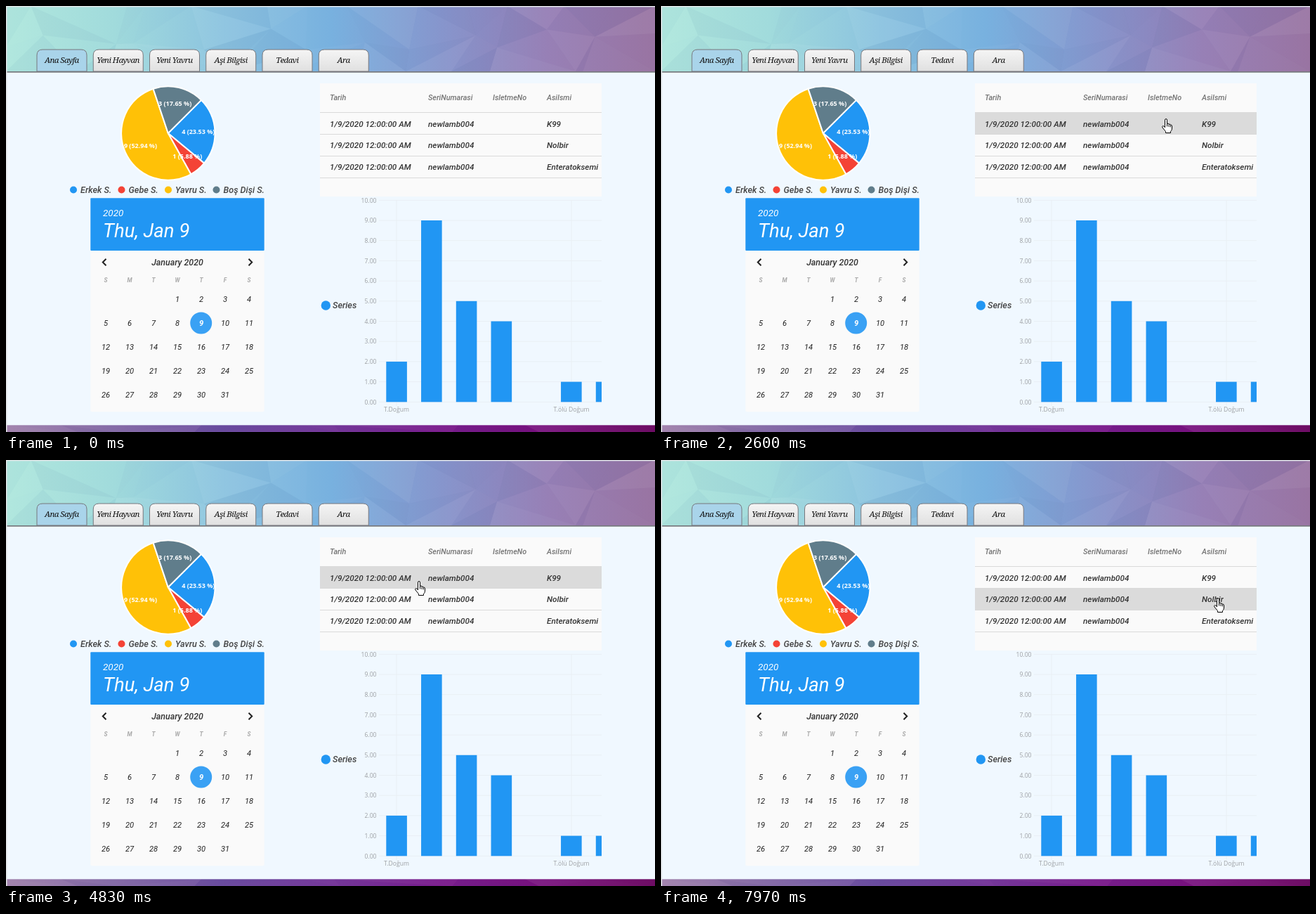
Write an HTML page that moves like this. It is 924x606 px and loops after 8 s.

```html
<!DOCTYPE html>
<html lang="tr">
<head>
<meta charset="utf-8">
<style>
  html, body { margin: 0; width: 100%; height: 100%; overflow: hidden; background: #f0f8ff; }
  svg { display: block; width: 924px; height: 606px; }
  text { font: italic 500 11.7px Roboto, sans-serif; fill: #333; white-space: pre; }
  .mid { text-anchor: middle; }
  .end { text-anchor: end; }
  .tab { font: italic 400 11.5px "Noto Serif", serif; letter-spacing: -.55px; fill: #111; }
  .pie { font: 700 9px "Open Sans", sans-serif; fill: #fff; }
  .key { font-size: 12.6px; fill: #444; }
  .head { font-size: 10.75px; fill: #737373; }
  .head.on { fill: #333; }
  .axis { font: 400 8.6px "Open Sans", sans-serif; fill: #9c9fa2; }
  .year { font-size: 13.5px; font-weight: 400; fill: #fff; }
  .date { font-size: 27.6px; font-weight: 400; fill: #fff; }
  .month { font-size: 12.4px; }
  .week { font-size: 8.4px; font-weight: 700; fill: #aaa; }
  .day { font-size: 11.2px; font-weight: 400; fill: #222; }
  .today { font-size: 11.2px; font-weight: 700; fill: #fff; }
  .tip { font-size: 12.3px; }
</style>
</head>
<body>
<svg viewBox="0 0 924 606">
  <defs>
    <linearGradient id="sky"></linearGradient>
    <linearGradient id="foot"></linearGradient>
    <linearGradient id="tab" x2="0" y2="1">
      <stop stop-color="#f5f5f5"/><stop offset="1" stop-color="#e0e0e0"/>
    </linearGradient>
  </defs>
  <g id="page"></g>
  <g id="table"></g>
  <g id="tip">
    <rect x="-.5" y=".5" width="103" height="42" rx="3" fill="#000" opacity=".05"/>
    <rect width="102" height="41" rx="2" fill="#fafafa" opacity=".8"/>
    <text class="tip" x="13.5" y="15">T.Dişi Kuzu S.</text>
    <circle cx="17.3" cy="28" r="6.7" fill="#2196f3"/>
    <text class="tip" x="28" y="32">Series</text>
    <text class="tip" x="67.5" y="32">5.00</text>
  </g>
  <g id="hand" stroke="#000" stroke-linejoin="round" stroke-linecap="round">
    <path fill="#fff" d="M4.5 12V2.2Q4.5.6 6 .6T7.5 2.2V7.5Q9.7 6.3 10 8.3Q12 7.3 12.3 9.2Q14.4 8.6 14.5 11V14Q14.5 17 12.5 18.5V20.5H5.5V18.5L1 13Q0 11 1.6 10.6Q3 10.6 4.5 12.6Z"/>
    <path fill="none" d="M7.5 8v3M10 9v2.5M12.3 10v2"/>
  </g>
</svg>
<script>
const $ = id => document.getElementById(id);
const BLUE = '#2196f3', RED = '#f44336', AMBER = '#ffc107', SLATE = '#607d8b';

const rect = (x, y, w, h, fill, more = '') =>
  `<rect x="${x}" y="${y}" width="${w}" height="${h}" fill="${fill}" ${more}/>`;
const dot = (x, y, r, fill) => `<circle cx="${x}" cy="${y}" r="${r}" fill="${fill}"/>`;
const line = (d, color, w = 1) => `<path d="${d}" fill="none" stroke="${color}" stroke-width="${w}"/>`;
const text = (x, y, s, cls = '') => `<text x="${x}" y="${y}" class="${cls}">${s}</text>`;
const stops = colors => colors.split(' ').map((c, i, all) =>
  `<stop offset="${i / (all.length - 1)}" stop-color="#${c}"/>`).join('');

let seed = 7;
const rand = () => (seed = seed * 16807 % 2147483647) / 2147483647;

// low-poly shading: a jittered grid cut into faint light and dark triangles
function facets(top, height, nx, ny, strength) {
  const w = 924 / nx, h = height / ny, pts = [];
  for (let j = 0; j <= ny; j++)
    for (let i = 0; i <= nx; i++) {
      const x = i % nx ? (i + rand() - .5) * w : i * w;
      const y = j % ny ? (j + (rand() - .5) * .8) * h : j * h;
      pts.push(`${x.toFixed(1)},${(top + y).toFixed(1)}`);
    }
  let out = '';
  for (let j = 0; j < ny; j++)
    for (let i = 0; i < nx; i++) {
      const a = j * (nx + 1) + i, b = a + 1, c = a + nx + 1, d = c + 1;
      for (const tri of rand() < .5 ? [[a, b, c], [b, c, d]] : [[a, b, d], [a, c, d]]) {
        const shade = (rand() - .5) * strength;
        out += `<polygon points="${tri.map(k => pts[k]).join(' ')}" fill="${shade > 0 ? '#fff' : '#204080'}" opacity="${Math.abs(shade)}"/>`;
      }
    }
  return out;
}

function banner() {
  $('sky').innerHTML = stops('b0e7dd a1dbdc 8cc3df 78b1df 8595cc 957eb5 9873a1');
  $('foot').innerHTML = stops('9c7ca8 8167a4 6c4c9f 76389a 7a1c8c 760f7b 65005c');
  const tabs = ['Ana Sayfa', 'Yeni Hayvan', 'Yeni Yavru', 'Aşi Bilgisi', 'Tedavi', 'Ara'].map((s, i) => {
    const x = 44 + 80.25 * i;
    return `<path d="M${x} 93V70q0 -8 8 -8h55q8 0 8 8v23z" fill="${i ? 'url(#tab)' : '#a9d4ea'}" stroke="#77777c"/>` +
      text(x + 35.3, 81, s, 'tab mid');
  }).join('');
  return rect(0, 0, 924, 606, '#f0f8ff') +
    rect(0, 0, 924, 93, 'url(#sky)') + facets(0, 93, 13, 2, .12) +
    rect(0, 596.3, 924, 10, 'url(#foot)') + facets(596.3, 10, 9, 1, .14) +
    rect(0, 0, 924, 1.4, '#e4e8ea') + rect(0, 0, 1.5, 606, '#e2e5e8') +
    rect(1.5, 93, 922.5, 1.7, '#76787c') + tabs;
}

function pie() {
  const cx = 230.8, cy = 181, r = 66.7;
  const at = (a, d = r) => [cx + d * Math.cos(a), cy + d * Math.sin(a)];
  let a = -Math.PI / 4, slices = '', labels = '', keys = '';
  const parts = [[4, BLUE, 'Erkek S.', 96], [1, RED, 'Gebe S.', 164.5], [9, AMBER, 'Yavru S.', 231], [3, SLATE, 'Boş Dişi S.', 299.5]];
  for (const [n, color, name, x] of parts) {
    const b = a + n / 17 * 2 * Math.PI, [lx, ly] = at((a + b) / 2, 43);
    slices += `<path d="M${cx} ${cy}L${at(a)}A${r} ${r} 0 ${+(n > 8)} 1 ${at(b)}Z" fill="${color}" stroke="#fff" stroke-width="2"/>`;
    labels += text(lx, ly + 3.3, `${n} (${(n / .17).toFixed(2)} %)`, 'pie mid');
    keys += dot(x, 261.5, 5, color) + text(x + 10, 266, name, 'key');
    a = b;
  }
  return slices + labels + keys;
}

function calendar() {
  let out = rect(120.3, 273.3, 247.4, 304, '#fafafa', 'rx="2"') + rect(120.3, 273.3, 247.4, 74.7, BLUE, 'rx="1"') +
    text(138, 299, '2020', 'year') + text(138, 328.5, 'Thu, Jan 9', 'date') +
    text(244, 368.7, 'January 2020', 'month mid') +
    line('M142.5 359.8l-4.7 4.7l4.7 4.7M345.5 359.8l4.7 4.7l-4.7 4.7', '#222', 2);
  [...'SMTWTFS'].forEach((s, i) => out += text(142 + 34 * i, 392.5, s, 'week mid'));
  for (let d = 1; d <= 31; d++) {
    const x = 142 + 34 * ((d + 2) % 7), y = 417 + 34 * Math.floor((d + 2) / 7);
    if (d === 9) out += dot(x - .3, y, 15.5, '#3aa1f4');
    out += text(x, y + 4, d, d === 9 ? 'today mid' : 'day mid');
  }
  return out;
}

function chart() {
  const unit = 28.7, base = 563.3;
  let out = rect(447, 110, 401, 161, '#fafafa');
  for (let i = 0; i <= 10; i++) {
    const y = base - unit * i;
    out += line(`M531 ${y}H848`, '#e9eff4') + text(527.5, y + 3.2, i.toFixed(2), 'axis end');
  }
  out += line('M556 276V569M805 276V569', '#e9eff4');
  [2, 9, 5, 4, 0, 1, 1].forEach((n, i) => {
    const x = 541.3 + 49.75 * i;
    out += rect(x, base - unit * n, Math.min(29.6, 848 - x), unit * n, BLUE);
  });
  return out + text(556, 577, 'T.Doğum', 'axis mid') + text(805, 577, 'T.ölü Doğum', 'axis mid') +
    dot(455.3, 426, 6.7, BLUE) + text(465, 430.3, 'Series', 'key');
}

const cols = [['Tarih', 461], ['SeriNumarasi', 601], ['IsletmeNo', 693], ['AsiIsmi', 770]];
const vaccines = ['K99', 'Nolbir', 'Enteratoksemi'];

function table(row, col) {
  let out = row >= 0 ? rect(447, 151.5 + 31 * row, 401, 31, '#dbdbdb') : '';
  for (let i = 0; i < 4; i++) out += line(`M447 ${151.5 + 31 * i}H848`, '#dadada');
  cols.forEach(([s, x], i) => out += text(x, 134, s, i === col ? 'head on' : 'head'));
  vaccines.forEach((name, i) => {
    ['1/9/2020 12:00:00 AM', 'newlamb004', '', name].forEach((s, j) =>
      out += text(cols[j][1], 171.5 + 30.8 * i, s));
  });
  return out;
}

// pointer turning points: time, left, top
const path = [
  [530, 805, 606], [1070, 518, 426], [1450, 442, 340], [2160, 690, 126], [2600, 713, 160],
  [2980, 735, 166], [3270, 766, 212], [3640, 774, 214], [4110, 774, 214], [4740, 605, 172],
  [5100, 514, 172], [5940, 625, 158], [6370, 601, 127], [7000, 790, 136], [7300, 774, 132],
  [7970, 787, 196], [8000, 787, 196]
];

function pointer(t) {
  const i = path.findIndex(p => p[0] > t);
  if (i < 1) return null;
  const [a, b] = [path[i - 1], path[i]], k = (t - a[0]) / (b[0] - a[0]);
  return [1, 2].map(j => Math.round(a[j] + (b[j] - a[j]) * k));
}

const show = (el, on) => el.setAttribute('visibility', on ? 'visible' : 'hidden');
const move = (el, x, y) => el.setAttribute('transform', `translate(${x} ${y})`);
let state;

function draw(now) {
  const t = now % 8000, p = pointer(t);
  let row = -1, col = -1;
  show($('hand'), p);
  if (p) {
    const [x, y] = p;
    move($('hand'), x, y);
    if (x + 6 >= 447 && y < 245) {
      if (y >= 152) row = Math.floor((y - 152) / 31);
      else col = cols.filter(c => c[1] - 14 <= x + 6).length - 1;
    }
  }
  if (state !== row + '/' + col) {
    state = row + '/' + col;
    $('table').innerHTML = table(row, col);
  }
  const k = Math.min(1, Math.max(0, (t - 780) / 180));
  show($('tip'), t >= 780 && t < 1700);
  move($('tip'), 447 + 213.3 * k, 271 + 153.5 * k);
  requestAnimationFrame(draw);
}

$('page').innerHTML = banner() + pie() + calendar() + chart();
draw(0);
</script>
</body>
</html>
```
